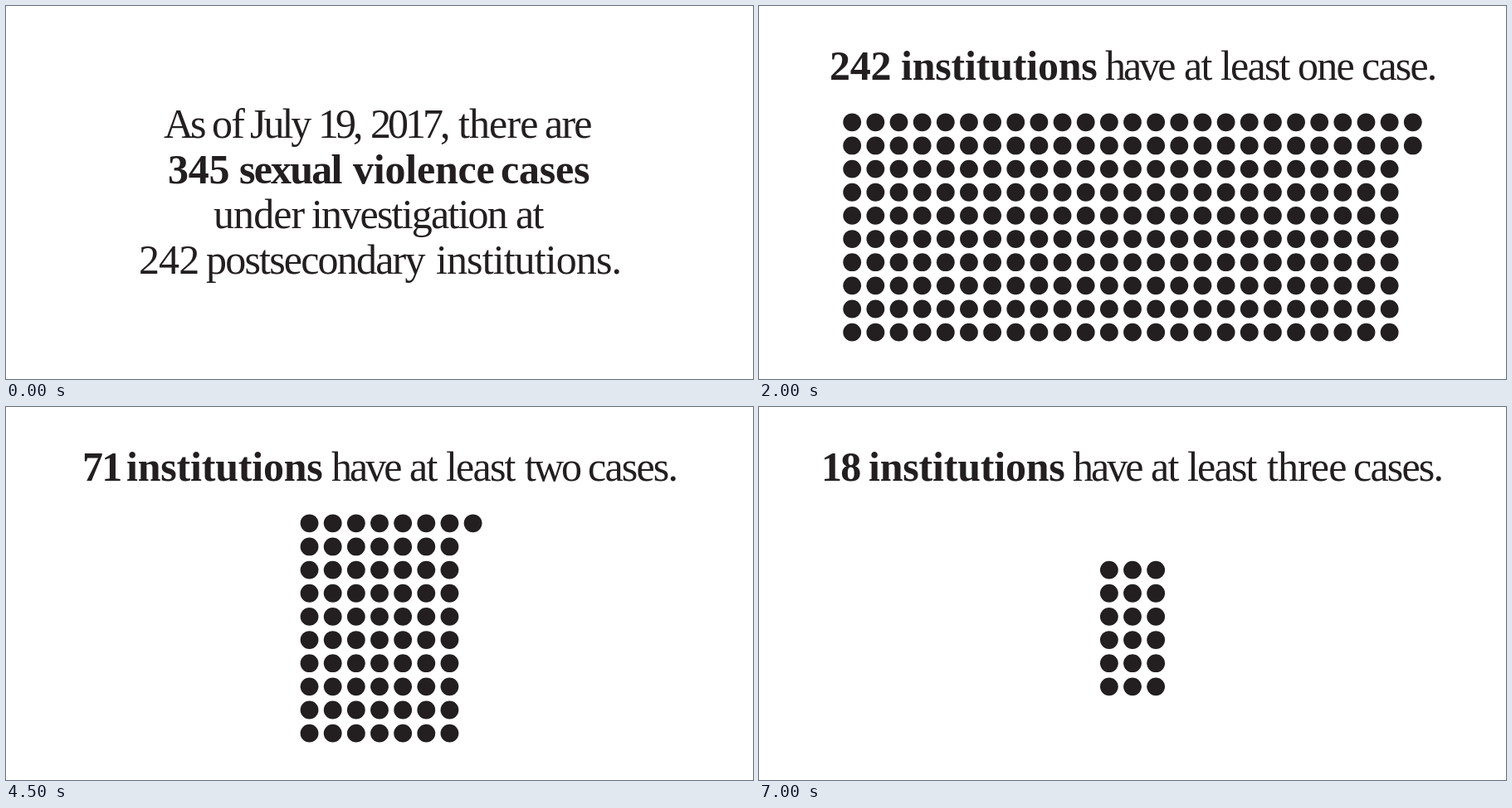
Recreate the animation shown at these times as an HTML page. Size 900x450 px, loop 8000 ms.

```html
<!DOCTYPE html>
<html lang="en">
<head>
<meta charset="utf-8">
<title>Cases by institution</title>
<style>
  html, body { margin: 0; width: 100%; height: 100%; overflow: hidden; background: #fff; }
  svg { display: block; width: 100vw; height: 100vh; fill: #231f20; }
  text { font: 50px "Liberation Serif", "Times New Roman", serif; letter-spacing: -1.8px; }
  .loose { letter-spacing: -.9px; }
  .snug { letter-spacing: -3px; }
  .tight { letter-spacing: -4px; }
  .b { font-weight: 700; letter-spacing: -.2px; }
  .b.snug { letter-spacing: -1.8px; }
  .scene { opacity: 0; animation: 8s step-end infinite; }
  #intro { animation-name: intro; }
  #one { animation-name: one; }
  #two { animation-name: two; }
  #three { animation-name: three; }
  @keyframes intro { 0% { opacity: 1 } 6.25%, 100% { opacity: 0 } }
  @keyframes one { 0% { opacity: 0 } 6.25% { opacity: 1 } 37.5%, 100% { opacity: 0 } }
  @keyframes two { 0% { opacity: 0 } 37.5% { opacity: 1 } 68.75%, 100% { opacity: 0 } }
  @keyframes three { 0% { opacity: 0 } 68.75%, 100% { opacity: 1 } }
</style>
</head>
<body>
<svg viewBox="0 0 900 450">
  <g class="scene" id="intro">
    <text y="159">
      <tspan class="tight" x="190">As</tspan> <tspan x="248">of</tspan> <tspan class="snug" x="294">July</tspan>
      <tspan class="tight" x="376">19,</tspan> <tspan class="tight" x="439">2017,</tspan>
      <tspan class="loose" x="545">there</tspan> <tspan x="649">are</tspan>
    </text>
    <text class="b" y="214">
      <tspan x="195">345</tspan> <tspan class="b snug" x="281">sexual</tspan>
      <tspan x="418">violence</tspan> <tspan x="596">cases</tspan>
    </text>
    <text y="268">
      <tspan class="loose" x="250">under</tspan> <tspan x="368">investigation</tspan> <tspan x="614">at</tspan>
    </text>
    <text y="323">
      <tspan class="loose" x="160">242</tspan> <tspan x="241">postsecondary</tspan>
      <tspan class="loose" x="518">institutions.</tspan>
    </text>
  </g>
  <g class="scene" id="one">
    <text y="89">
      <tspan class="b" x="85">242</tspan> <tspan class="b" x="171">institutions</tspan>
      <tspan class="snug" x="417">have</tspan> <tspan x="512">at</tspan> <tspan x="556">least</tspan>
      <tspan x="649">one</tspan> <tspan x="726">case.</tspan>
    </text>
  </g>
  <g class="scene" id="two">
    <text y="89">
      <tspan class="b snug" x="92">71</tspan> <tspan class="b" x="145">institutions</tspan>
      <tspan class="snug" x="392">have</tspan> <tspan x="486">at</tspan> <tspan x="530">least</tspan>
      <tspan class="snug" x="625">two</tspan> <tspan x="701">cases.</tspan>
    </text>
  </g>
  <g class="scene" id="three">
    <text y="89">
      <tspan class="b snug" x="75">18</tspan> <tspan class="b" x="132">institutions</tspan>
      <tspan class="snug" x="378">have</tspan> <tspan x="472">at</tspan> <tspan x="516">least</tspan>
      <tspan class="loose" x="612">three</tspan> <tspan x="716">cases.</tspan>
    </text>
  </g>
</svg>
<script>
  const PITCH = 28.15;

  // Fills column by column from the top left dot.
  function dots(id, count, rows, left, top) {
    const scene = document.getElementById(id);
    for (let i = 0; i < count; i++) {
      const dot = document.createElementNS(scene.namespaceURI, "circle");
      dot.setAttribute("cx", left + Math.floor(i / rows) * PITCH);
      dot.setAttribute("cy", top + (i % rows) * PITCH);
      dot.setAttribute("r", 10.9);
      scene.append(dot);
    }
  }

  dots("one", 242, 10, 450 - 12 * PITCH, 140.3);
  dots("two", 71, 10, 450 - 3 * PITCH, 140.3);
  dots("three", 18, 6, 450 - PITCH, 140.3 + 2 * PITCH);
</script>
</body>
</html>
```
